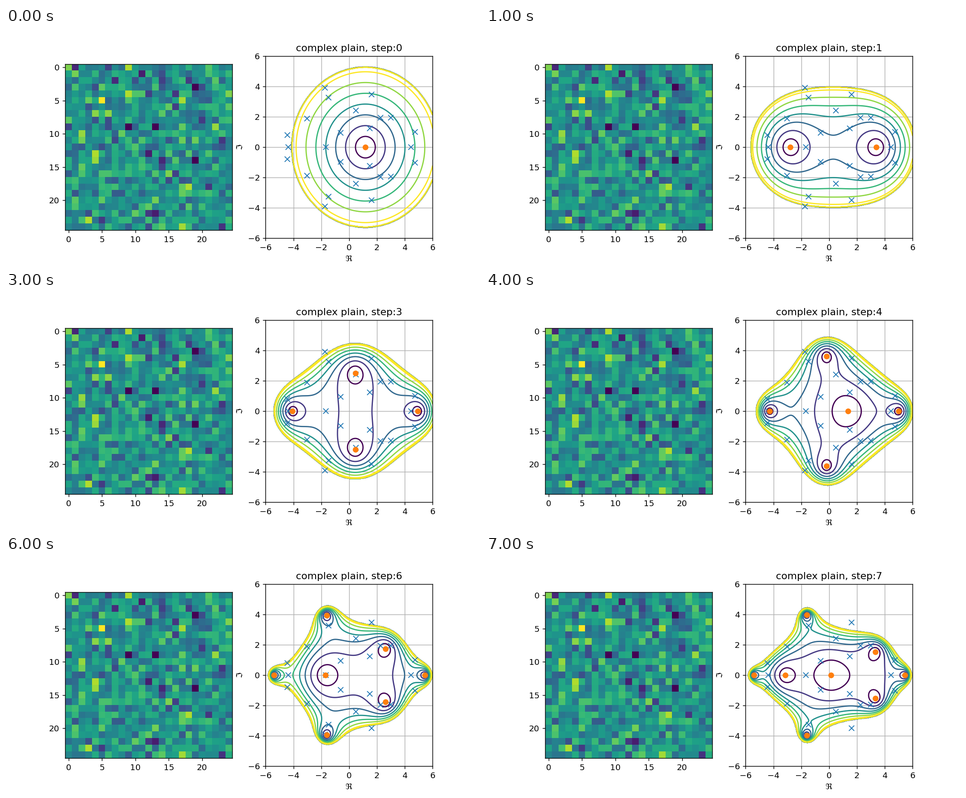
Recreate the animation shown at these times as a matplotlib script. Size 1058x529 px, loop 8 s.

```python
import numpy as np
import matplotlib.pyplot as plt
from matplotlib.animation import FuncAnimation

SIZE = 25
LIMIT = 6
CUTOFF = 1.485
LEVELS = 0.2 * np.arange(1, 8)

# Upper half plane only; complex values get their conjugates.
EIGENVALUES = [-1.72 + 3.92j, -1.49 + 3.27j, -3.01 + 1.89j, -4.44 + 0.8j,
               -4.38, -1.67, -0.61 + 0.96j, 0.49 + 2.42j, 1.49 + 1.24j,
               1.61 + 3.49j, 2.26 + 1.96j, 3.01 + 1.95j, 4.74 + 1.02j, 4.45]

# Ritz values of each Arnoldi step.
RITZ_VALUES = [
    [1.17],
    [-2.8, 3.4],
    [-3.81, 0.37, 4.82],
    [-4.08, 4.93, 0.44 + 2.52j],
    [-4.29, 5.0, -0.19 + 3.63j, 1.36],
    [-5.21, 5.44, -1.61 + 3.9j, 1.78 + 2.02j],
    [-5.39, 5.44, -1.62 + 3.95j, 2.6 + 1.75j, -1.7],
    [-5.42, -3.14, 0.13, 5.44, 3.33 + 1.53j, -1.62 + 3.98j],
]


def with_conjugates(values):
    values = np.array(values, dtype=complex)
    return np.concatenate([values, values[values.imag > 0].conj()])


def make_matrix():
    rng = np.random.default_rng(3)
    matrix = np.clip(rng.normal(0.5, 0.15, (SIZE, SIZE)), 0.08, 0.88)
    matrix[[3, 9, 9, 14], [19, 9, 13, 19]] = 0
    matrix[5, 5] = 1
    return matrix


def polynomial_scale(step):
    # Each step multiplies by the typical subdiagonal of a random Hessenberg form.
    return 3.557 * np.prod(np.sqrt(SIZE - 2 - np.arange(step)))


axis = np.linspace(-LIMIT, LIMIT, 500)
X, Y = np.meshgrid(axis, axis)
Z = X + 1j * Y
eigenvalues = with_conjugates(EIGENVALUES)

fig, (ax_matrix, ax_plane) = plt.subplots(1, 2, figsize=(8, 4), dpi=132.25)
ax_matrix.imshow(make_matrix(), vmin=0, vmax=1, interpolation="nearest")


def update(step):
    ritz = with_conjugates(RITZ_VALUES[step])
    size = np.abs(np.prod([Z - root for root in ritz], axis=0))
    size /= polynomial_scale(step)
    # Dropping to zero past the cutoff piles all contours on its border.
    size[size > CUTOFF] = 0

    ax = ax_plane
    ax.clear()
    ax.grid(True)
    ax.contour(X, Y, size, levels=LEVELS, cmap="viridis")
    ax.plot(eigenvalues.real, eigenvalues.imag, "x", color="C0", zorder=3)
    ax.plot(ritz.real, ritz.imag, "o", color="C1", zorder=3)
    ax.set(xlim=(-LIMIT, LIMIT), ylim=(-LIMIT, LIMIT),
           xlabel=r"$\Re$", ylabel=r"$\Im$",
           title=f"complex plain, step:{step}")
    ticks = range(-LIMIT, LIMIT + 1, 2)
    ax.set_xticks(ticks)
    ax.set_yticks(ticks)


anim = FuncAnimation(fig, update, frames=len(RITZ_VALUES), interval=1000,
                     init_func=lambda: update(0), repeat=True)
plt.show()
```
